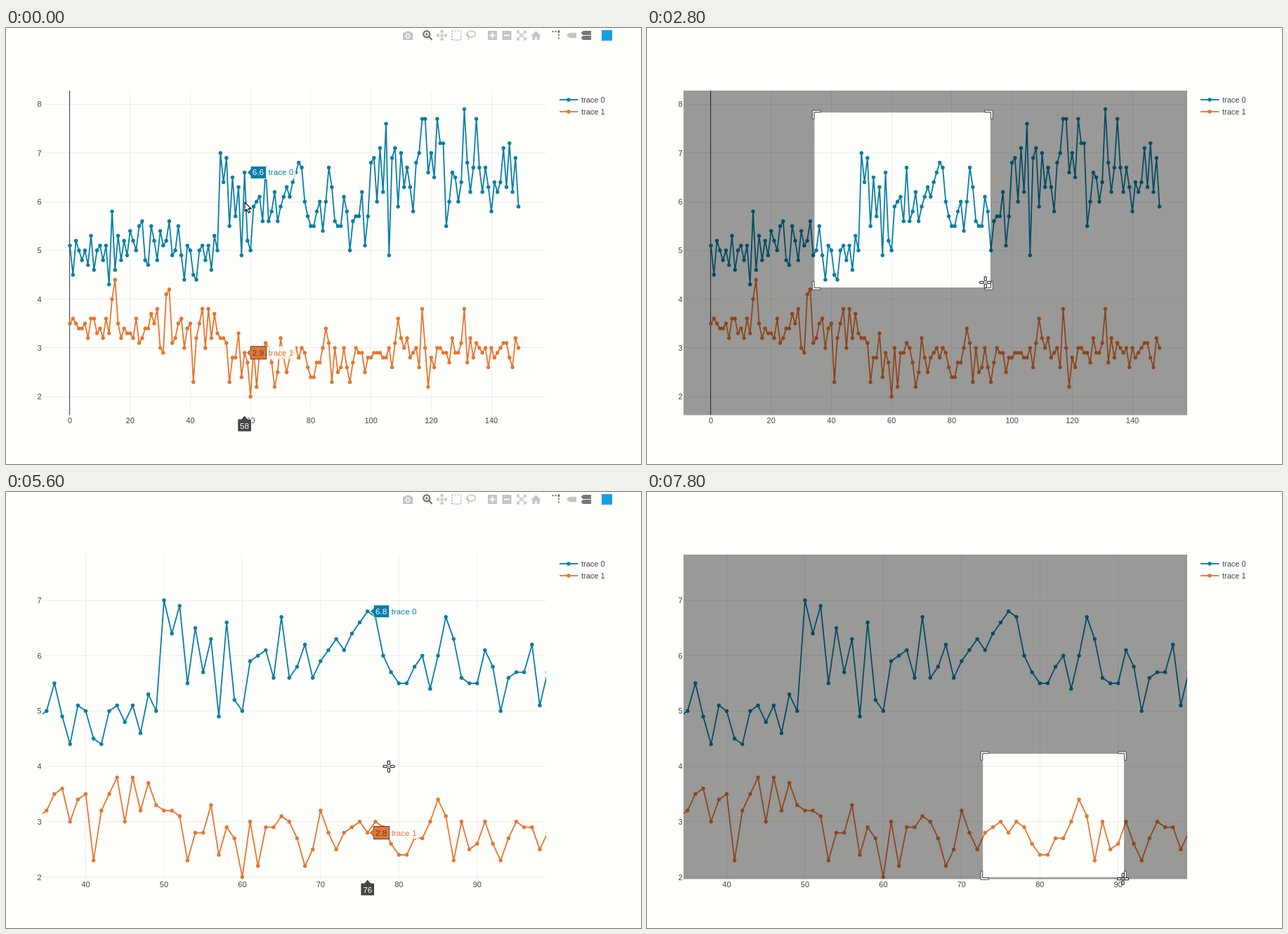
Recreate the animation shown at these times as an HTML page with a canvas. Size 904 px wide and 620 px high, loop 8000 ms.

```html
<!DOCTYPE html>
<html lang="en">
<head>
<meta charset="utf-8">
<title>Zooming a line chart</title>
<style>
html, body { margin: 0; width: 100%; height: 100%; overflow: hidden; background: #fffffc; }
canvas { display: block; }
</style>
</head>
<body>
<canvas id="stage" width="904" height="620"></canvas>
<script>
const ctx = document.getElementById('stage').getContext('2d');
const FONT = 'px "Liberation Sans", Arial, sans-serif';
const BG = '#fffffc', INK = '#444', LOOP = 8000;
const plot = { l: 52, t: 89, r: 769, b: 550.5 };

let seed = 11;
const random = () => (seed = seed * 16807 % 2147483647) / 2147483647;

// Values in tenths: the zoomed stretch from MID on is given,
// the ends are noise around a mean, with a few known spikes
const MID = 34;
function series(before, after, middle, spikes) {
  return Array.from({ length: 150 }, (_, i) => {
    const [mean, spread] = i < MID ? before : after;
    const noise = Math.round(mean + (random() + random() - 1) * spread);
    return spikes[i] ?? middle[i - MID] ?? noise;
  });
}

const traces = [
  { name: 'trace 0', color: '#067ea5', edge: '#fff', y: series([50, 7], [65, 10], [
    49,50,55,49,44,51,50,45,44,50,51,48,51,46,53,50,70,64,69,55,65,57,
    63,49,66,52,50,59,60,61,56,67,56,58,62,56,59,61,63,61,64,66,68,67,
    60,57,55,55,58,60,54,60,67,63,56,55,55,61,58,50,56,57,57,62,51,57
  ], { 0: 51, 13: 43, 14: 58, 105: 76, 106: 49, 117: 77, 118: 77, 122: 77, 131: 79, 135: 77, 149: 59 }) },
  { name: 'trace 1', color: '#e87530', edge: INK, y: series([34, 5], [29, 4.5], [
    31,32,35,36,30,34,35,23,32,35,38,30,38,32,37,33,32,32,31,23,28,28,
    33,24,29,27,20,30,22,29,29,31,30,27,22,25,32,28,25,28,29,30,28,30,
    29,26,24,24,27,27,30,34,31,23,30,25,26,30,26,23,27,30,29,29,25,28
  ], { 0: 35, 14: 40, 15: 44, 32: 41, 33: 42, 109: 36, 117: 38, 119: 22, 131: 38, 149: 30 }) }
];

// Pixel position of the zero point, pixels per unit, and ticks
const views = [
  { x0: 91, kx: 4.286, y0: 662.8, ky: 69.3, first: 0, last: 140, step: 20, top: 8 },
  { x0: -332.3, kx: 11.145, y0: 704.9, ky: 78.7, first: 40, last: 90, step: 10, top: 7 }
];

// Pointer path: time, x, y
const path = [
  [0, 340, 248], [770, 238.5, 120], [1800, 238.5, 120], [1900, 255, 138],
  [2800, 489, 369], [3170, 559, 427], [3400, 559, 427], [3470, 572, 428],
  [3600, 572, 428], [3770, 546, 496], [3900, 546, 496], [3970, 537, 496],
  [4100, 537, 496], [4450, 515, 527], [5300, 515, 527], [5500, 518, 450],
  [5600, 555.5, 367], [5900, 478, 372], [6000, 478, 372], [6400, 620, 462],
  [6500, 661, 501], [6670, 673, 564], [6900, 673, 564], [7070, 677, 559],
  [7500, 677, 559], [7570, 674, 556], [7700, 674, 556], [7800, 679, 548]
];
const drags = [
  { from: 1900, to: 4800, x: 238.5, y: 120.3 },
  { from: 6100, to: LOOP, x: 478.2, y: 372.3 }
];

const clamp = (v, a, b) => Math.min(b, Math.max(a, v));

function pointer(t) {
  t = clamp(t, 0, 7800);
  const i = Math.max(1, path.findIndex(p => p[0] >= t));
  const [a, b] = [path[i - 1], path[i]];
  const k = (t - a[0]) / (b[0] - a[0]);
  return { x: a[1] + (b[1] - a[1]) * k, y: a[2] + (b[2] - a[2]) * k };
}

function rect(color, x, y, w, h) {
  ctx.fillStyle = color;
  ctx.fillRect(x, y, w, h);
}

function shape(d, fill, stroke, width = 1) {
  const p = new Path2D(d);
  if (fill) { ctx.fillStyle = fill; ctx.fill(p, 'evenodd'); }
  if (stroke) { ctx.strokeStyle = stroke; ctx.lineWidth = width; ctx.stroke(p); }
}

function dot(color, x, y, r = 2.7) {
  ctx.fillStyle = color;
  ctx.beginPath();
  ctx.arc(x, y, r, 0, 7);
  ctx.fill();
}

function label(text, x, y, size, color, align = 'left') {
  ctx.font = size + FONT;
  ctx.fillStyle = color;
  ctx.textAlign = align;
  ctx.fillText(text, x, y);
}

function drawChart(v) {
  const tick = n => Math.floor(v.x0 + n * v.kx);
  for (let n = v.first; n <= v.last; n += v.step) {
    rect('#eee', tick(n), plot.t, 1, plot.b - plot.t);
    label(n, v.x0 + n * v.kx, 562, 11, INK, 'center');
  }
  for (let n = 2; n <= v.top; n++) {
    const y = v.y0 - n * v.ky;
    rect('#eee', plot.l, Math.floor(y), plot.r - plot.l, 1);
    label(n, 50.5, y + 4, 11, INK, 'right');
  }
  if (!v.first) rect(INK, tick(0) - 1, plot.t, 1, plot.b - plot.t);

  ctx.save();
  ctx.beginPath();
  ctx.rect(plot.l, plot.t, plot.r - plot.l, plot.b - plot.t);
  ctx.clip();
  ctx.lineWidth = 1.8;
  ctx.lineJoin = 'round';
  for (const { color, y } of traces) {
    const points = y.map((n, i) => [v.x0 + i * v.kx, v.y0 - n / 10 * v.ky]);
    ctx.strokeStyle = color;
    ctx.beginPath();
    points.forEach(p => ctx.lineTo(...p));
    ctx.stroke();
    points.forEach(p => dot(color, ...p));
  }
  ctx.restore();
}

function drawLegend() {
  traces.forEach(({ name, color }, i) => {
    const y = 102 + 17 * i;
    rect(color, 788, y - 0.9, 26.5, 1.8);
    dot(color, 801, y);
    label(name, 819, y + 4, 11, INK);
  });
}

function drawHover(v, i) {
  const x = v.x0 + i * v.kx;
  for (const { name, color, edge, y } of traces) {
    const cy = v.y0 - y[i] / 10 * v.ky;
    rect('rgba(255,255,252,.8)', x + 31, cy - 9, 42, 18);
    shape(`M${x + 4} ${cy}l4.5-4.5v-4.5h22.5v18h-22.5v-4.5z`, color, edge);
    label(y[i] / 10, x + 19.3, cy + 4, 11.7, edge, 'center');
    label(name, x + 34, cy + 4, 11.7, color);
  }
  shape(`M${x} 551l4.5 5h5.3v18h-19.6v-18h5.3z`, INK, BG);
  label(i, x, 569.5, 11.7, '#fff', 'center');
}

function drawZoomBox(d, t) {
  const end = pointer(t);
  const r = clamp(end.x, plot.l, plot.r), b = clamp(end.y, plot.t, plot.b);
  const shade = 0.4 * Math.min(1, (t - d.from + 60) / 200);
  shape(`M${plot.l} ${plot.t}H${plot.r}V${plot.b}H${plot.l}zM${d.x} ${d.y}H${r}V${b}H${d.x}z`,
    `rgba(0,0,0,${shade})`);
  const len = Math.min(9, (r - d.x) / 2, (b - d.y) / 2);
  for (const sx of [1, -1]) for (const sy of [1, -1]) {
    const x = sx > 0 ? d.x : r, y = sy > 0 ? d.y : b;
    shape(`M${x - 3.2 * sx} ${y + len * sy}h${2.7 * sx}v${-(len + 0.5) * sy}h${len * sx}` +
      `v${-2.7 * sy}h${-(len + 2.7) * sx}z`, BG, INK);
  }
}

const LIGHT = '#c5c5c5', DARK = '#777';
const solid = [
  [LIGHT, 'M565 6.5h3l1.5-2h5l1.5 2h3v10.5h-14zM572 8a3.5 3.5 0 1 0 .01 0z'],
  [LIGHT, 'M686 4h13v13h-13zM691.5 6.5v3h-3v2h3v3h2v-3h3v-2h-3v-3z'],
  [LIGHT, 'M706.5 4h13v13h-13zM709 9.5v2h8v-2z'],
  [LIGHT, 'M727 3.5h5l-5 5zM741 3.5v5l-5-5zM741 17.5h-5l5-5zM727 17.5v-5l5 5z'],
  [LIGHT, 'M747.5 11l7-6.8 7 6.8h-2v6h-3.6v-4h-2.8v4h-3.6v-6z'],
  [DARK, 'M777.5 4h2v2h-2zM781.5 4h2v2h-2zM785.3 3.5h3.2v3.2h-3.2zM786 9h2v2h-2zM786 13.5h2v2h-2z'],
  [LIGHT, 'M798 10.5l4-3.8h10v7.6h-10z'],
  [DARK, 'M818.5 7l3-3h11.5v6h-11.5zM818.5 14l3-3h11.5v6h-11.5z']
];
const outlined = [
  [DARK, 2.2, 'M598.8 4.2a4.6 4.6 0 1 0 .01 0M602.5 12.5l4 4.5'],
  [DARK, 1.2, 'M596.5 8.8h4.6M598.8 6.5v4.6'],
  [LIGHT, 1.6, 'M614 10.5h13M620.5 4v13M618 6l2.5-2.5 2.5 2.5M618 15l2.5 2.5 2.5-2.5M616 8l-2.5 2.5 2.5 2.5M625 8l2.5 2.5-2.5 2.5'],
  [LIGHT, 1.6, 'M655.5 10.5c0-4 3.5-6.5 7.5-6.3s6 2.5 5.2 5.2-4.5 4.2-8 3.6-4.5-2.3-3-3 3 2 .5 6.5'],
  [LIGHT, 1.7, 'M728 4.5l12 12M740 4.5l-12 12']
];

function drawToolbar(alpha) {
  ctx.globalAlpha = alpha;
  solid.forEach(([color, d]) => shape(d, color));
  dot(LIGHT, 572, 11.5, 1.9);
  outlined.forEach(([color, width, d]) => shape(d, null, color, width));
  ctx.setLineDash([2.2, 1.7]);
  shape('M634.8 4.2h13v13h-13z', null, LIGHT, 1.8);
  ctx.setLineDash([]);
  rect('#14a0e1', 848, 3, 15, 15);
  ctx.globalAlpha = 1;
}

function drawCursor({ x, y }, arrow) {
  ctx.save();
  ctx.translate(x, y);
  if (arrow) {
    shape('M0 0v12.5l3-2.7 2.3 5 2.2-1-2.3-4.9h3.9z', '#fff', '#000', 1.1);
  } else {
    for (let i = 0; i < 4; i++) {
      shape('M-1.5-2.5v-5.5h3v5.5z', '#fff', '#111');
      ctx.rotate(Math.PI / 2);
    }
    rect('#111', -0.6, -0.6, 1.2, 1.2);
  }
  ctx.restore();
}

function toolbarAlpha(t) {
  if (t < 4800) return clamp(1 - (t - 1800) / 300, 0, 1);
  if (t < 6000) return clamp((t - 4700) / 300, 0, 1);
  return clamp(1 - (t - 5900) / 300, 0, 1);
}

function draw() {
  const t = Math.min(7800, Math.floor(performance.now() % LOOP / 100) * 100);
  const view = views[t < 4800 ? 0 : 1];
  const drag = drags.find(d => t >= d.from && t < d.to);
  rect(BG, 0, 0, 904, 620);
  drawChart(view);
  drawLegend();
  drawToolbar(toolbarAlpha(t));
  if (drag) drawZoomBox(drag, t);
  else if (t !== 4800) drawHover(view, Math.round((pointer(t - 100).x - view.x0) / view.kx));
  drawCursor(pointer(t - 28), t < 100);
  requestAnimationFrame(draw);
}
draw();
</script>
</body>
</html>
```
